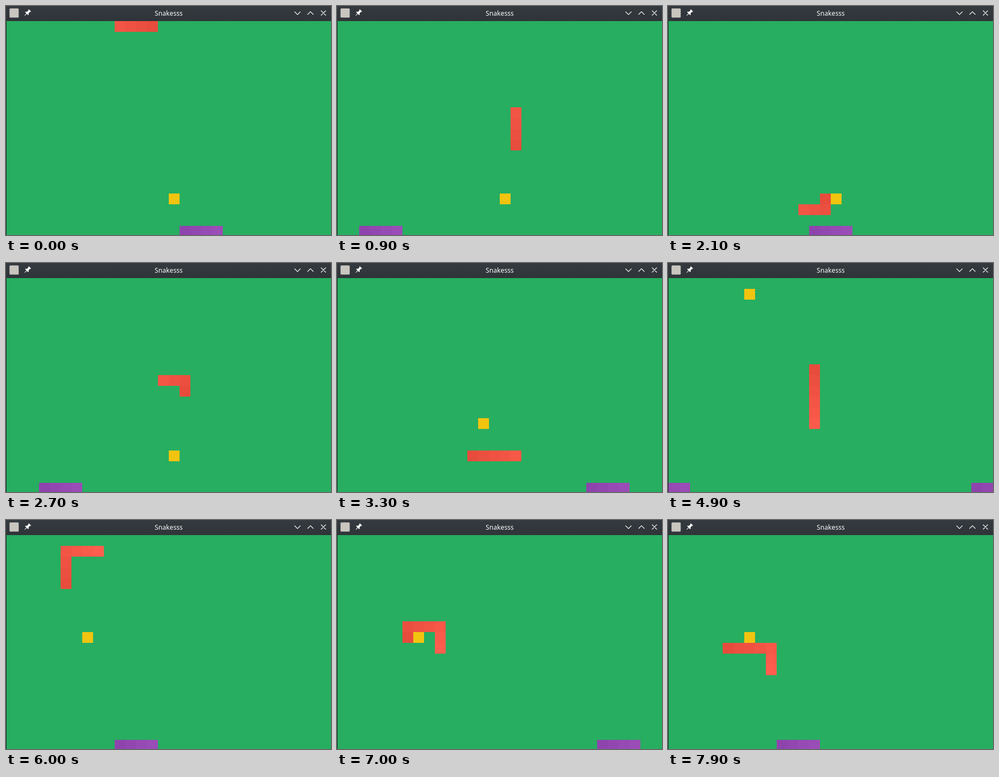
These frames come from a looping animation (601x425 px, 8000 ms). An HTML page with a canvas:

```html
<!DOCTYPE html>
<html lang="en">
<head>
<meta charset="utf-8">
<title>Snakesss</title>
<style>
  html, body { margin: 0; width: 100%; height: 100%; overflow: hidden; background: #1c2426; }
  svg, canvas { position: absolute; display: block; }
  svg { left: 0; top: 0; }
  canvas { left: 1px; top: 28px; }
  text { font: 12px "Noto Sans", sans-serif; letter-spacing: .1px; fill: #fcfcfc; text-anchor: middle; }
</style>
</head>
<body>
<svg width="601" height="28" viewBox="0 0 601 28">
  <defs>
    <linearGradient id="bar" x2="0" y2="1">
      <stop offset="0" stop-color="#343a3f"/>
      <stop offset="1" stop-color="#2f3439"/>
    </linearGradient>
  </defs>
  <rect width="601" height="28" fill="url(#bar)"/>
  <rect x="6.5" y="4.5" width="17" height="17" rx="1.5" fill="#c9c6c0"/>
  <g transform="translate(40 12.4) rotate(45)" fill="#fcfcfc">
    <path d="M-3-6H3V-4.6H2V-.5L4 1.2V2.6H-4V1.2L-2-.5V-4.6H-3Z"/>
    <path d="M-.6 2.6H.6L.3 8H-.3Z"/>
  </g>
  <text x="301" y="18">Snakesss</text>
  <path d="M533.5 10.5l5.5 5.5 5.5-5.5M557.5 16l5.5-5.5 5.5 5.5M582.5 8.5l9 9M591.5 8.5l-9 9"
        fill="none" stroke="#fcfcfc" stroke-width="1.1"/>
</svg>
<canvas id="board" width="600" height="397"></canvas>
<script>
const LOOP = 8000, FRAME = 100, CELL = 20, COLS = 30;
const ctx = document.getElementById("board").getContext("2d");

// Corners of the red snake's route, as column and row.
const corners = [
  [10, 0], [16, 0], [16, 18], [10, 18], [10, 17], [14, 17], [14, 9],
  [16, 9], [16, 16], [9, 16], [9, 12], [15, 12], [15, 15], [13, 15],
  [13, 1], [5, 1], [5, 10], [9, 10], [9, 8], [6, 8], [6, 13], [9, 13],
  [9, 10], [5, 10]
];

// Each food lasts until the move on which it is eaten.
const foods = [
  { cell: [15, 16], until: 50 },
  { cell: [13, 13], until: 73 },
  { cell: [7, 1], until: 91 },
  { cell: [7, 9], until: Infinity }
];

const START = 3;   // route index of the head before the first move
const RED = [231, 76, 60], PURPLE = [142, 68, 173];

function walk(points) {
  const cells = [points[0]];
  for (const [tx, ty] of points.slice(1)) {
    let [x, y] = cells[cells.length - 1];
    while (x !== tx || y !== ty) {
      x += Math.sign(tx - x);
      y += Math.sign(ty - y);
      cells.push([x, y]);
    }
  }
  return cells;
}

const route = walk(corners);

function fillCell([x, y], color) {
  ctx.fillStyle = color;
  ctx.fillRect(x * CELL, y * CELL, CELL, CELL);
}

// Segments get lighter from head to tail.
function shade([r, g, b], i) {
  return `rgb(${r + 4 * i},${g + 3 * i},${b + 3 * i})`;
}

function drawSnake(length, color, cellAt) {
  for (let i = 0; i < length; i++) fillCell(cellAt(i), shade(color, i));
}

function draw(frame) {
  const moves = Math.floor(1.6 * frame + 0.3);
  const eaten = foods.filter(f => f.until <= moves).length;
  const wrap = x => ((x % COLS) + COLS) % COLS;

  ctx.fillStyle = "#27ae60";
  ctx.fillRect(0, 0, 600, 397);
  fillCell(foods[eaten].cell, "#f1c40f");
  drawSnake(4, PURPLE, i => [wrap(16 - moves + i), 19]);
  drawSnake(4 + eaten, RED, i => route[START + moves - i]);
}

const start = performance.now();
function tick() {
  const t = (performance.now() - start) % LOOP;
  draw(Math.floor(t / FRAME));
  requestAnimationFrame(tick);
}
tick();
</script>
</body>
</html>
```
